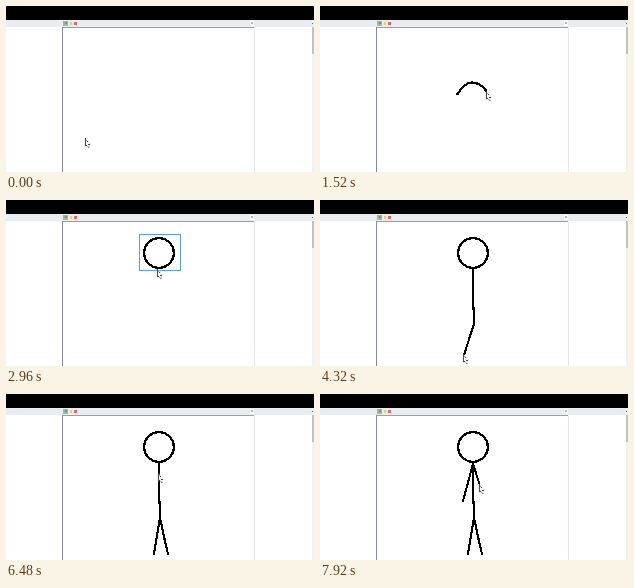
An HTML page that plays this animation: 308 by 166 pixels, repeating every 8000 ms.

```html
<!DOCTYPE html>
<html lang="en">
<head>
<meta charset="utf-8">
<title>Drawing a stick figure</title>
<style>
  html, body { margin: 0; width: 100%; height: 100%; overflow: hidden; background: #fff; }
  svg { display: block; width: 100%; height: 100%; shape-rendering: crispEdges; }
  .ink { fill: none; stroke: #000; stroke-width: 2.1; stroke-linecap: round; stroke-linejoin: round; }
  .bold { stroke-width: 2.3; }
</style>
</head>
<body>
<svg viewBox="0 0 308 166">
  <rect width="308" height="166" fill="#fff"/>
  <rect width="308" height="14" fill="#000"/>
  <rect y="14" width="308" height="7" fill="#e8edf1"/>
  <rect x="306" y="14" width="2" height="152" fill="#f1f1f1"/>
  <rect x="306" y="21" width="2" height="27" fill="#bfc1c4"/>
  <rect x="306" y="17" width="1" height="1" fill="#777"/>
  <path d="M248.5 22V166" stroke="#e6e6f0"/>
  <path d="M57 21.5H248" stroke="#9a9cb0"/>
  <path d="M56.5 21V166" stroke="#85889c"/>
  <rect x="57" y="15" width="5" height="5" fill="#a5b5a3"/>
  <path d="M58.5 19V16H61V18H58.5" fill="#6f9a6c"/>
  <rect x="64" y="16" width="2" height="3" fill="#e6d267"/>
  <rect x="68" y="16" width="3" height="3" fill="#dd6a68"/>
  <rect x="244" y="15" width="4" height="5" fill="#fff"/>
  <rect x="245" y="16" width="2" height="2" fill="#b4b8be"/>
  <g id="strokes"></g>
  <g id="head">
    <circle class="ink bold" cx="153" cy="95" r="14.8"/>
    <rect id="selection" x="133.5" y="76.5" width="41" height="36" fill="none" stroke="#57a0d3"/>
  </g>
  <g id="cursor" shape-rendering="auto" fill="none">
    <path d="M0 0V8.6L2 6.8L3.4 10L4.9 9.3L3.5 6.3H5.6Z" fill="#fff" stroke="#aaa" stroke-width=".4"/>
    <path d="M.5 0V8M1 7.5H2M3 6.5H5M3 8.5L4 9.8M1.5 2.5L3 4" stroke="#222" stroke-width=".8"/>
  </g>
</svg>
<script>
const LOOP = 8000, STEP = 80;
const $ = id => document.getElementById(id);

// start, end, path, ink class ('' = pen up), time the ink is replaced
const timeline = [
  [0, 400, 'M80 132L101 114'],
  [480, 960, 'M101 114L137.5 88'],
  [960, 1520, 'M137.5 88Q144 77 152 76.5Q160 76.5 166.5 85', 'ink bold', 1760],
  [1520, 1760, 'M166.5 85Q169 90 167.8 96', 'ink bold', 1760],
  [1760, 1760, 'M139.4 89.2A14.8 14.8 0 0 1 167.8 96', 'ink bold', 2320],
  [1840, 2240, 'M167.8 96A14.8 14.8 0 0 1 139.4 89.2', 'ink bold', 2320],
  [2240, 2560, 'M139.4 89.2L152 111'],
  [2640, 2960, 'M152 111V69'],
  [3040, 3200, 'M153 68V81', 'ink'],
  [3280, 3360, 'M153 81V89', 'ink'],
  [3440, 3680, 'M153 89L153.5 108', 'ink'],
  [3760, 4000, 'M153.5 108L154 124', 'ink'],
  [4000, 4160, 'M154 124L147 145.5', 'ink', 5280],
  [4240, 4320, 'M147 145.5L144.3 154', 'ink', 5280],
  [4320, 4480, 'M144.3 154L154 124'],
  [4480, 4560, 'M154 124L156 133', 'ink'],
  [4640, 4800, 'M156 133L159 147', 'ink'],
  [5040, 5120, 'M159 147L156.8 138'],
  [5200, 5520, 'M156.8 138L162 160', 'ink'],
  [5280, 5280, 'M154 124L148 160', 'ink'],
  [5520, 5760, 'M162 160L154 131'],
  [5840, 6160, 'M154 131Q143 105 153 68'],
  [6240, 6480, 'M153 68V79'],
  [6480, 6640, 'M153 79V70'],
  [6640, 7200, 'M153 70L143 107', 'ink'],
  [7200, 7520, 'M143 107L153 70'],
  [7600, 7920, 'M153 70L159.5 90', 'ink']
];

const segments = timeline.map(([start, end, d, ink = '', until = LOOP]) => {
  const path = document.createElementNS('http://www.w3.org/2000/svg', 'path');
  path.setAttribute('d', d);
  path.setAttribute('class', ink);
  if (!ink) path.setAttribute('fill', 'none');
  $('strokes').append(path);
  return { start, end, ink, until, path, length: path.getTotalLength() };
});

const progress = (t, start, end) =>
  end > start ? Math.min(1, Math.max(0, (t - start) / (end - start))) : +(t >= start);
const show = (el, on) => { el.style.display = on ? '' : 'none'; };

function render(t) {
  let tip;
  for (const { start, end, ink, until, path, length } of segments) {
    const p = progress(t, start, end);
    if (end > start && t >= start) tip = path.getPointAtLength(p * length);
    if (!ink) continue;
    show(path, p > 0 && t < until);
    path.style.strokeDasharray = p < 1 ? `${p * length} ${length + 9}` : 'none';
  }
  const x = Math.round(tip.x - 1), y = Math.round(tip.y);
  $('cursor').setAttribute('transform', `translate(${x} ${y})`);
  show($('head'), t >= 2320);
  $('head').setAttribute('transform', `translate(0 ${-42 * progress(t, 2640, 2960)})`);
  show($('selection'), t >= 2720 && t < 3120);
}

const origin = performance.now();
function frame() {
  const t = (performance.now() - origin) % LOOP;
  render(Math.floor(t / STEP) * STEP);
  requestAnimationFrame(frame);
}
frame();
</script>
</body>
</html>
```
